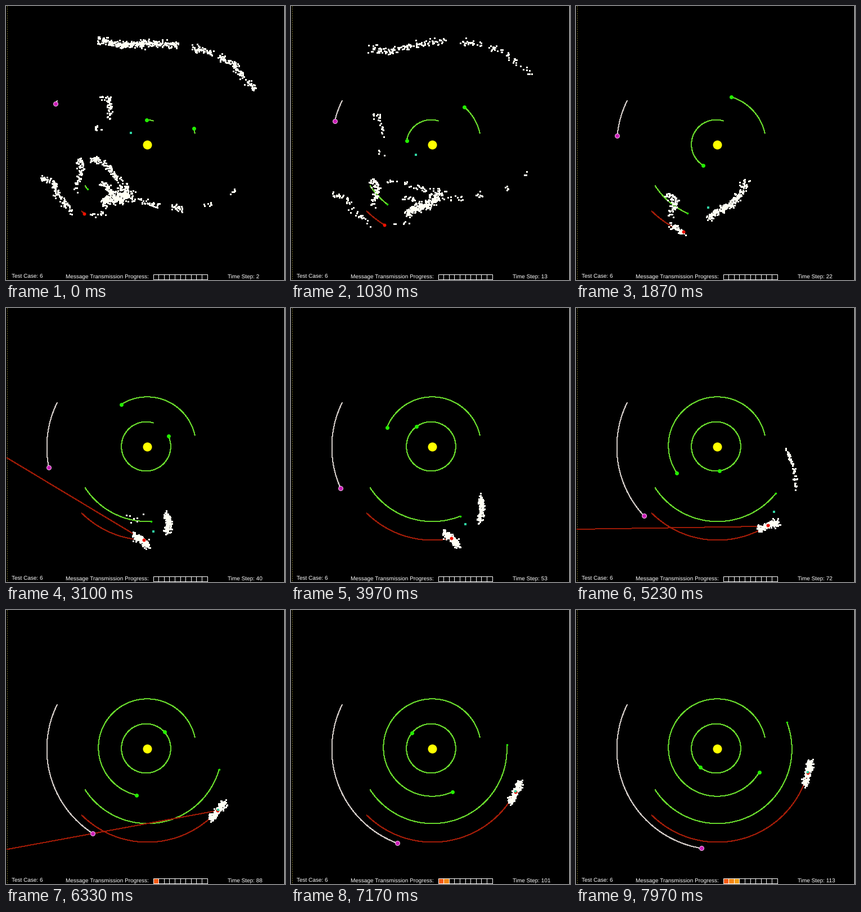
Animation, 496 px wide and 488 px high, one loop 8 s. Source, as a matplotlib script:

```python
import numpy as np
import matplotlib
import matplotlib.pyplot as plt
from matplotlib.animation import FuncAnimation
from matplotlib.patches import Circle, Rectangle

matplotlib.rcParams["toolbar"] = "None"
matplotlib.rcParams["text.hinting"] = "none"

W, H, DPI = 496, 488, 100
PX = 72 / DPI
FRAMES, INTERVAL = 250, 32
SUN_X, SUN_Y = 251.5, 247.5
GREEN, LIME = "#22ee00", "#66d42c"

rng = np.random.default_rng(6)

fig = plt.figure(figsize=(W / DPI, H / DPI), dpi=DPI, facecolor="black")
ax = fig.add_axes([0, 0, 1, 1])
ax.set_xlim(0, W)
ax.set_ylim(H, 0)
ax.axis("off")


def line(color, z):
    return ax.plot([], [], color=color, lw=PX, zorder=z, antialiased=False)[0]


def dot(color, size, z, marker="o", edge=None):
    return ax.plot([], [], ls="", marker=marker, ms=size * PX, mfc=color,
                   mec=edge or color, mew=PX if edge else 0, zorder=z)[0]


def label(x, text):
    return ax.text(x, 485, text, color="white", family="Liberation Sans",
                   size=10 * PX, va="baseline", zorder=9)


def kepler_rate(radius):
    """Degrees travelled per time step at a distance from the sun."""
    return 2268 / radius ** 1.5


class Body:
    """A body on a slightly off-centre circular orbit, leaving a trail."""

    def __init__(self, x, y, radius, start, marker, trail):
        self.x, self.y, self.radius = x, y, radius
        self.rate = kepler_rate(radius)
        self.start = start
        self.ecc = np.degrees(np.hypot(SUN_X - x, SUN_Y - y) / radius)
        self.perihelion = np.degrees(np.arctan2(y - SUN_Y, SUN_X - x))
        self.marker, self.trail = marker, trail

    def angle(self, step):
        m = self.start + self.rate * step
        return m + self.ecc * np.sin(np.radians(m - self.perihelion))

    def position(self, step):
        a = np.radians(self.angle(step))
        return (self.x + self.radius * np.cos(a),
                self.y - self.radius * np.sin(a))

    def draw(self, step):
        first = max(0, step - 365 / self.rate)
        self.trail.set_data(*self.position(np.linspace(first, step, 200)))
        x, y = self.position(step)
        self.marker.set_data([x], [y])


ship = Body(251.5, 247.5, 166, 225.3, dot("#ee1100", 6, 6), line("#a01c08", 2))
station = Body(251.5, 247.7, 179, 153.8,
               dot("#cc1fb8", 8, 5, edge="#f0b8e8"), line("#cfc8c4", 2))
bodies = [
    Body(249, 246.5, 43.8, 70, dot(GREEN, 7, 5), line(LIME, 2)),
    Body(251, 245, 86.7, 10.6, dot(GREEN, 7, 5), line(LIME, 2)),
    Body(251.5, 248, 132.3, 213.1, dot(GREEN, 3.6, 5), line(LIME, 2)),
    ship, station,
]


class Stream:
    """Particles strewn along a curve at one step, each orbiting the sun."""

    def __init__(self, count, curve, key=2, birth=(0, 1), death=(4, 20),
                 speed=1.0):
        pts = np.array(curve, float)
        u = rng.uniform(0, len(pts) - 1, count)
        knots = np.arange(len(pts))
        noise = rng.normal(0, 2.9, (2, count))
        x = np.interp(u, knots, pts[:, 0]) + noise[0] - SUN_X
        y = SUN_Y - np.interp(u, knots, pts[:, 1]) - noise[1]
        self.radius = np.hypot(x, y)
        self.angle = np.arctan2(y, x)
        self.rate = np.radians(speed * kepler_rate(self.radius))
        self.key = key
        self.birth = rng.uniform(*birth, count)
        self.death = rng.uniform(*death, count)

    def points(self, step):
        a = self.angle + self.rate * (step - self.key)
        alive = (self.birth <= step) & (step < self.death)
        return np.column_stack([SUN_X + self.radius * np.cos(a),
                                SUN_Y - self.radius * np.sin(a)])[alive]


class Escort:
    """An elongated cluster that catches up with the ship and lines up."""

    def __init__(self, count):
        self.along = rng.uniform(-1, 1, count)
        self.noise = rng.normal(0, 2.9, (2, count))
        self.birth = rng.uniform(14, 40, count)

    def points(self, step):
        lag = np.interp(step, [22, 53], [4, 0])
        x, y = ship.position(step - lag)
        tilt = np.interp(step, [22, 53, 80], [10, 55, 0])
        a = np.radians(ship.angle(step) + 90 - tilt)
        reach = self.along * (12 + 0.09 * step)
        return np.column_stack([x + reach * np.cos(a) + self.noise[0],
                                y - reach * np.sin(a) + self.noise[1]]
                               )[self.birth <= step]


swarms = [
    Escort(190),
    # upper arc
    Stream(310, [(166, 60), (205, 69), (250, 66), (306, 69)]),
    Stream(55, [(333, 75), (365, 83)]),
    Stream(100, [(381, 91), (405, 104), (422, 128)]),
    Stream(28, [(428, 134), (442, 150)]),
    # small hook
    Stream(55, [(170, 164), (183, 166), (185, 185), (184, 205)]),
    Stream(11, [(162, 214), (164, 220)]),
    # ring, left branch and tail
    Stream(85, [(152, 274), (166, 273), (186, 289), (200, 313)]),
    Stream(55, [(167, 316), (180, 320), (190, 335)]),
    Stream(120, [(62, 307), (84, 313), (92, 335), (118, 367)]),
    Stream(100, [(186, 352), (202, 322), (214, 338), (248, 348), (272, 357)]),
    Stream(28, [(296, 357), (314, 361)]),
    Stream(7, [(357, 352), (362, 352)]),
    Stream(9, [(404, 331), (408, 328)]),
    Stream(16, [(155, 371), (173, 367)]),
    # survivors of the first narrowing
    Stream(75, [(159, 335), (177, 346), (168, 373)], key=22, death=(22, 42)),
    Stream(230, [(236, 378), (249, 366), (275, 353), (290, 337), (304, 310)],
           key=22, death=(22, 38)),
    # second hypothesis, ahead of the ship
    Stream(170, [(286, 400), (290, 380), (284, 366)], key=40,
           birth=(24, 40), death=(53, 82), speed=1.3),
]

cloud = dot("#fffff4", 3, 4, "s")
beam = line("#9c1a06", 3)
mean = dot("#2fd3a2", 5, 7, "s")

# fixed scenery
ax.add_patch(Circle((SUN_X, SUN_Y), 8, color="#ffff00", lw=0, zorder=5))
ax.plot([1.5, 1.5], [0, H], color="#7c7428", lw=PX, dashes=(2, 2), zorder=1)
ax.add_patch(Rectangle((495, 0), 1, H, color="white", lw=0, zorder=1))
label(9.6, "Test Case: 6")
label(106.2, "Message Transmission Progress:")
clock = label(393.6, "")

CELL = 9.6
cells = []
for i in range(10):
    corner = (261.5 + i * CELL, 477.5)
    tint = (0.96, min(0.62, 0.35 + 0.18 * i), 0.08)
    cells.append(ax.add_patch(
        Rectangle(corner, CELL, 9, color=tint, lw=0, zorder=7)))
    ax.add_patch(Rectangle(corner, CELL, 9, fill=False, ec="white", lw=PX,
                           zorder=8))

CONTACT = 88


def aim(step):
    """Beam from ship to station; it swings to and fro until contact."""
    x, y = ship.position(step)
    tx, ty = station.position(step)
    a = np.arctan2(y - ty, x - tx)
    if step < CONTACT:
        a += np.radians(-6.4 + 12 * np.sin(np.pi * step / 8))
    length = min(400, (x - 2) / max(np.cos(a), 0.01))
    return [x, x - length * np.cos(a)], [y, y - length * np.sin(a)]


def update(k):
    t = (k + 0.5) * INTERVAL
    now = np.interp(t, [0, 1870, 3080, 5230, 6320, 8000],
                    [2.2, 22.5, 40.1, 73.03, 88.2, 113.6])
    step, shown = int(now), int(now - 0.1)  # the counter trails the bodies
    for body in bodies:
        body.draw(step)
    pts = np.vstack([s.points(step) for s in swarms])
    cloud.set_data(pts[:, 0], pts[:, 1])
    mean.set_data([pts[:, 0].mean()], [pts[:, 1].mean()])
    beam.set_data(*(aim(shown) if shown % 4 == 0 else ([], [])))
    clock.set_text(f"Time Step: {shown}")
    filled = 1 + (shown - CONTACT) // 12
    for i, cell in enumerate(cells):
        cell.set_visible(i < filled)
    return []


anim = FuncAnimation(fig, update, frames=FRAMES, interval=INTERVAL,
                     repeat=True, repeat_delay=0, blit=False)
plt.show()
```
